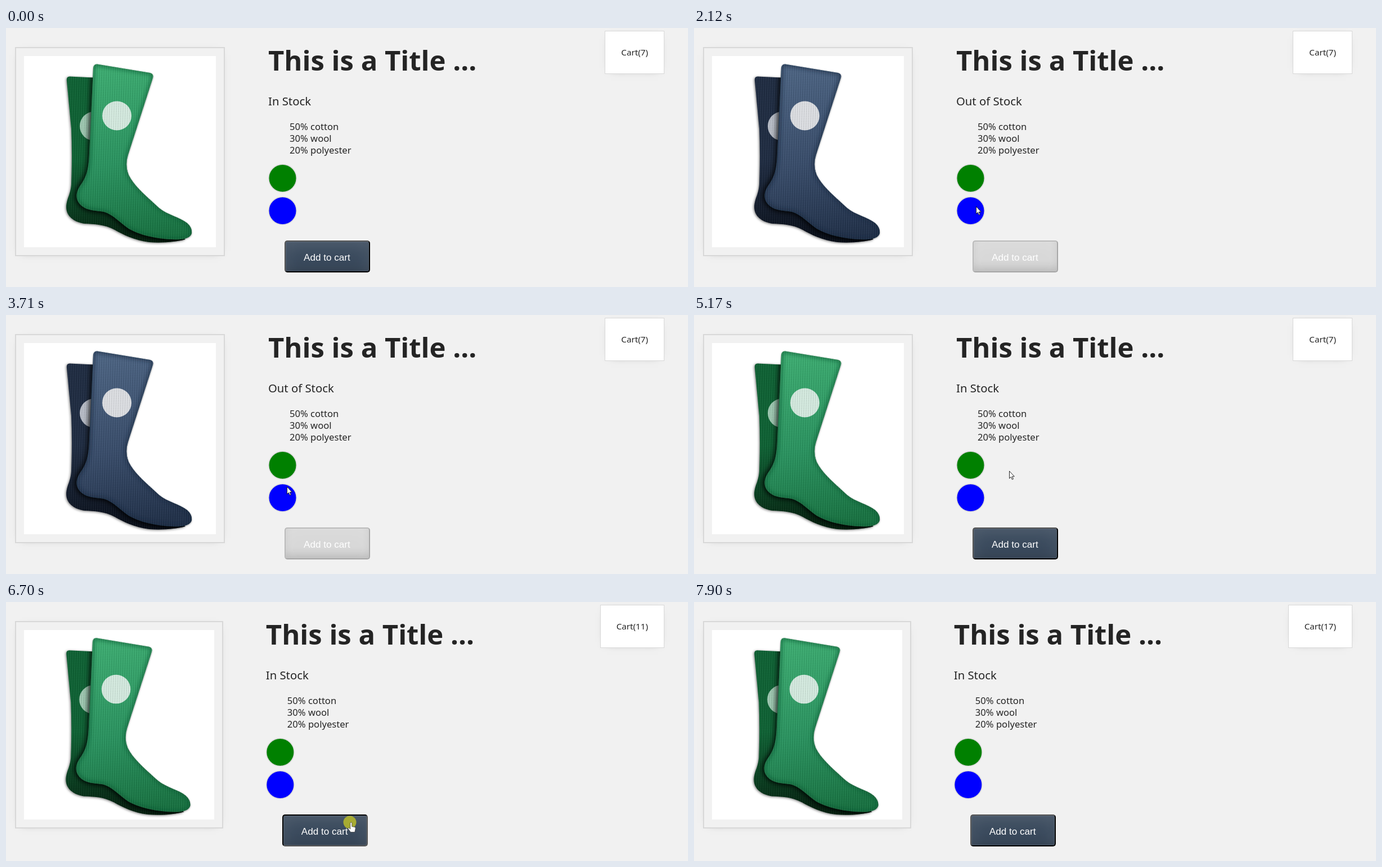
Animation of 1212 by 462 pixels, one loop 9100 ms. Source, as an HTML page:

```html
<!DOCTYPE html>
<html lang="en">
<head>
<meta charset="utf-8">
<title>Product page</title>
<style>
  html, body { margin: 0; width: 100%; height: 100%; overflow: hidden; background: #f1f1f1; }
  body {
    --light: #3dae72; --mid: #2a9460; --deep: #187342; --edge: #0f5a33;
    --back: #0e6234; --backDeep: #04210f; --patch: #d5ebe0; --backPatch: #9fc9b2;
  }
  body.blue {
    --light: #4d6584; --mid: #394d6b; --deep: #21314a; --edge: #17263d;
    --back: #1f2c42; --backDeep: #090f1a; --patch: #dddfe3; --backPatch: #b9bec8;
  }
  div, svg { position: absolute; box-sizing: border-box; }
  svg { left: 0; top: 0; }
  .card { border: 1px solid #d8d8d8; box-shadow: 0 2px 15px -12px rgba(0, 0, 0, .5); }
  #photo { left: 16px; top: 34px; border-width: 2px; }
  #photo::after { content: ""; position: absolute; inset: 14px; background: #fff; }
  #cart { right: calc(100% - 1170px); top: 5px; height: 77px; background: #fff; }
  #button {
    top: 379px; width: 152px; height: 57px; border: 2px outset #000; border-radius: 5px;
    background: #39495c; font-size: 17px;
    box-shadow: inset 0 -.6em 1em -.35em rgba(0, 0, 0, .17),
      inset 0 .6em 2em -.3em rgba(255, 255, 255, .15),
      inset 0 0 0 .05em rgba(255, 255, 255, .12);
  }
  #button.pressed { border-style: inset; }
  .blue #button { background: #d8d8d8; border: 2px solid; border-color: #bababa #a6a6a6 #a6a6a6 #bababa; }
  text { font-family: "Noto Sans", "Open Sans", sans-serif; fill: #242424; }
  .title { font-size: 49px; font-weight: 700; }
  .stock { font-size: 20.3px; }
  .detail { font-size: 16.6px; }
  .cart { font-size: 15.2px; text-anchor: end; }
  .label { font: 17.1px "Liberation Sans", Arial, sans-serif; fill: #fff; }
  .swatch { stroke: #d8d8d8; stroke-width: 1.5; }
</style>
</head>
<body>
<div id="photo" class="card"></div>
<div id="cart" class="card"></div>
<div id="button"></div>

<svg width="1212" height="462" viewBox="0 0 1212 462">
  <defs>
    <linearGradient id="frontFill" x1=".35" y1="0" x2=".5" y2="1">
      <stop offset="0" stop-color="var(--light)"/>
      <stop offset=".55" stop-color="var(--mid)"/>
      <stop offset="1" stop-color="var(--deep)"/>
    </linearGradient>
    <linearGradient id="backFill" x1="0" y1="0" x2=".15" y2="1">
      <stop offset=".5" stop-color="var(--back)"/>
      <stop offset="1" stop-color="var(--backDeep)"/>
    </linearGradient>
    <pattern id="knit" width="4" height="3" patternUnits="userSpaceOnUse" patternTransform="rotate(2)">
      <path d="M1 0V2" stroke="#000" stroke-opacity=".2"/>
      <path d="M3 1V3" stroke="#fff" stroke-opacity=".1"/>
    </pattern>
    <filter id="soft"><feGaussianBlur stdDeviation="3.5"/></filter>
    <path id="front" d="M162 64.5L256 80Q263 82 261 89L217 226Q211 245 218 262C228 283 254 304 272 321
      C288 334 308 337 322 348Q331 356 330 366Q328 375 311 377C276 379 238 370 218 358
      C203 348 191 333 174 328C158 325 143 327 131 314C121 302 126 289 134 278
      C145 262 147 246 148 224L155 71Q156 64 162 64.5Z"/>
    <path id="back" d="M113 86.5L165 89L170 310L319 377C303 381 280 384 254 382C229 379 209 369 193 360
      C175 350 157 350 139 349C121 346 107 336 107 319C108 303 115 297 116 278
      Q118 226 116 180L108 94Q107 87 113 86.5Z"/>
    <clipPath id="frontClip"><use href="#front"/></clipPath>
    <clipPath id="backClip"><use href="#back"/></clipPath>
  </defs>

  <g id="socks">
    <g style="filter:drop-shadow(-1px 1.5px 2px rgba(0,0,0,.55))">
      <use href="#back" fill="url(#backFill)"/>
      <circle cx="157" cy="175" r="26" fill="var(--backPatch)"/>
      <use href="#back" fill="url(#knit)"/>
      <use href="#front" clip-path="url(#backClip)" filter="url(#soft)" stroke="#000" stroke-width="9" opacity=".6"/>
    </g>
    <g style="filter:drop-shadow(0 1px 1.5px rgba(0,0,0,.4))">
      <use href="#front" fill="url(#frontFill)"/>
      <use href="#front" clip-path="url(#frontClip)" filter="url(#soft)" fill="none" stroke="var(--edge)" stroke-width="6" opacity=".7"/>
      <circle cx="197" cy="156.5" r="26" fill="var(--patch)"/>
      <use href="#front" fill="url(#knit)"/>
    </g>
  </g>

  <g id="details">
    <text class="title" x="466" y="76">This is a Title ...</text>
    <text class="stock" id="stock" x="466" y="138"></text>
    <text class="detail" x="504" y="181.5">50% cotton</text>
    <text class="detail" x="504" y="203">30% wool</text>
    <text class="detail" x="504" y="224">20% polyester</text>
    <circle class="swatch" cx="491.5" cy="268" r="24.7" fill="#008000"/>
    <circle class="swatch" cx="491.5" cy="326" r="24.7" fill="#00f"/>
    <text class="label" x="529" y="415">Add to cart</text>
  </g>
  <text class="cart" id="count" x="1141" y="49"></text>

  <g id="pointer">
    <circle id="halo" r="11.5" fill="#b9bb2a" fill-opacity=".85"/>
    <path id="arrow" d="M.5 .5V13.5L3.4 10.8L5.4 15.4L7.4 14.5L5.4 10H9.3Z" fill="#fff" stroke="#111" stroke-width=".9"/>
    <path id="hand" d="M.8 1.5a1.5 1.5 0 0 1 3 0V7.5L9 8.5Q10.5 9 10.2 11L8.8 17.5H1.5L-3 11.5Q-3.5 9.5-1.5 9.8L.8 12Z"
      fill="#fff" stroke="#333" stroke-width=".7"/>
  </g>
</svg>

<script>
  const LOOP = 9100, STEP = 66.3;
  const byId = id => document.getElementById(id);
  const show = (id, on) => byId(id).style.display = on ? "" : "none";

  // Pointer stops: step, x, y
  const path = [
    [7, 847, 426], [9, 683, 360], [11, 683, 360], [13, 530, 265], [17, 530, 265],
    [23, 484, 257], [26, 484, 257], [28, 502, 299], [32, 501, 318], [40, 501, 318],
    [44, 502, 280], [46, 501, 270], [53, 501, 270], [56, 499, 306], [57, 499, 314],
    [69, 499, 314], [73, 501, 285], [76, 525, 272], [78, 560, 278], [83, 611, 393],
    [117, 611, 393], [118, 604, 424]
  ];
  const presses = [88, 91, 95, 98, 101, 104, 106, 108, 111, 114];
  const releases = [90, 93, 97, 100, 103, 105, 107, 110, 113, 117];
  const blueSpans = [[29, 43], [56, 73]];

  function pointerAt(step) {
    const i = path.findIndex(stop => stop[0] >= step);
    if (i < 1) return path[0].slice(1);
    const [s0, x0, y0] = path[i - 1], [s1, x1, y1] = path[i];
    const p = (step - s0) / (s1 - s0);
    return [x0 + (x1 - x0) * p, y0 + (y1 - y0) * p];
  }

  function draw(time) {
    const step = Math.floor((time % LOOP + 6) / STEP);
    const passed = list => list.filter(s => s <= step).length;
    const clicks = passed(releases);
    const pressed = passed(presses) > clicks;
    const blue = blueSpans.some(([from, to]) => step >= from && step < to);
    const count = 7 + clicks, wide = count > 9;
    const shift = wide ? -4.2 : 0, size = wide ? 339 : 342;

    document.body.className = blue ? "blue" : "";
    byId("stock").textContent = blue ? "Out of Stock" : "In Stock";
    byId("count").textContent = `Cart(${count})`;
    byId("cart").style.width = (wide ? 114 : 106) + "px";
    byId("photo").style.width = byId("photo").style.height = size + 31 + "px";
    byId("socks").setAttribute("transform", `translate(32 50) scale(${size / 342}) translate(-32 -50)`);
    byId("details").setAttribute("transform", `translate(${shift} 0)`);
    byId("button").style.left = 495 + shift + "px";
    byId("button").className = pressed ? "pressed" : "";

    const onButton = step >= 84 && step < 119;
    show("pointer", step >= 7 && step < 119);
    show("halo", pressed);
    show("hand", onButton);
    show("arrow", !onButton);
    byId("pointer").setAttribute("transform", `translate(${pointerAt(step)})`);
  }

  const start = performance.now();
  function tick() {
    draw(performance.now() - start);
    requestAnimationFrame(tick);
  }
  tick();
</script>
</body>
</html>
```
